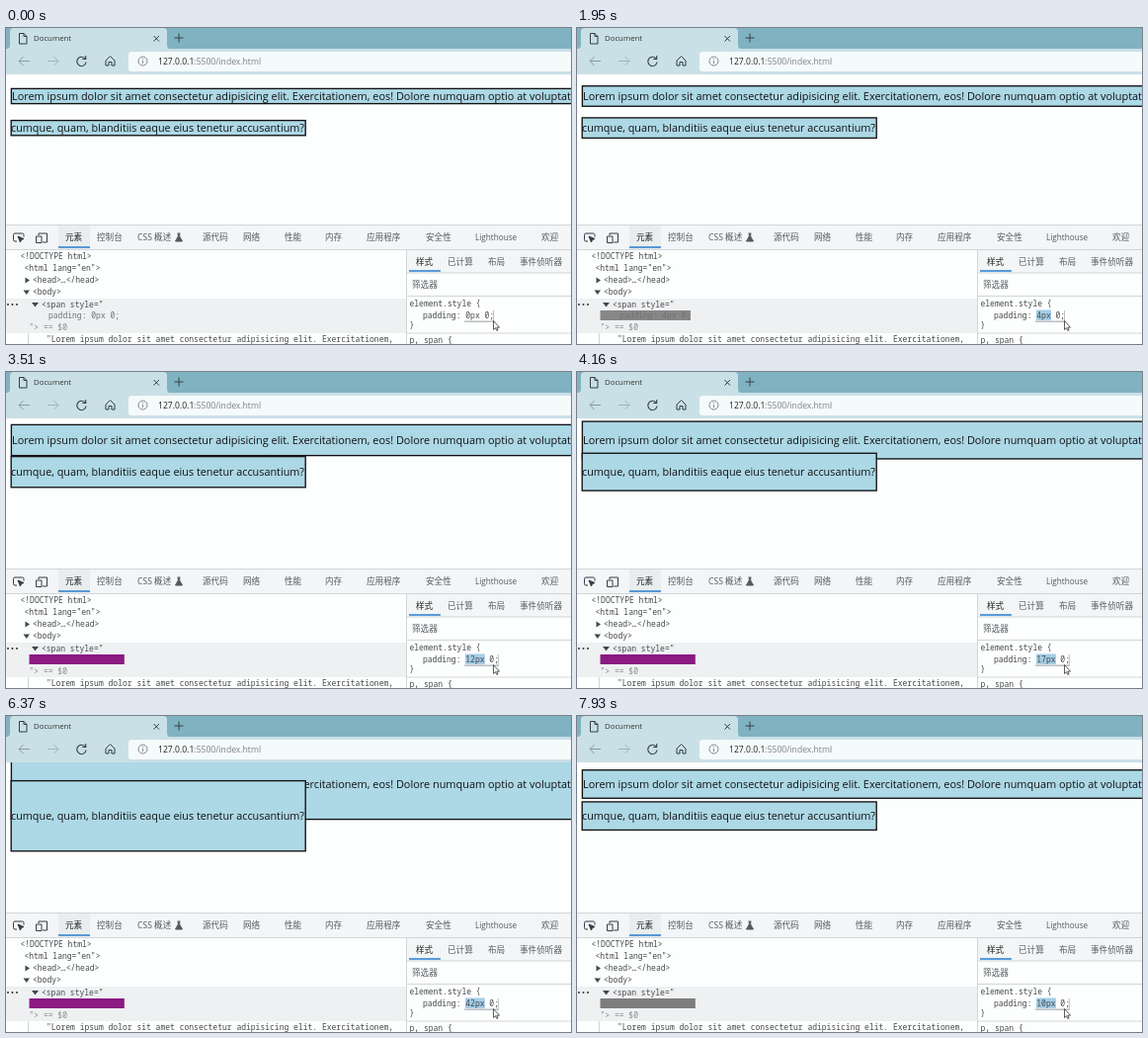
An HTML page for the animation above (8 s loop, 572 px wide and 320 px high).

```html
<!DOCTYPE html>
<html lang="en">
<head>
<meta charset="utf-8">
<style>
  html, body { margin: 0; width: 100%; height: 100%; overflow: hidden; background: #fdfefe; }
  svg { display: block; width: 572px; height: 320px; }
  text { white-space: pre; }
  .page { font-family: "Open Sans", "Noto Sans", sans-serif; fill: #111; }
  .ui { font: 8.6px "Open Sans", "Noto Sans CJK SC", "Noto Sans CJK", sans-serif; fill: #555b60; }
  .code { font: 8.03px "Noto Sans Mono", "DejaVu Sans Mono", monospace; fill: #45484c; }
  .box { fill: #add8e6; stroke: #111; stroke-width: 1.35; }
  .icon { fill: none; stroke: #333e44; stroke-width: 1; }
  .rule { stroke: #d2d5d8; stroke-width: 1; }
</style>
</head>
<body>
<svg viewBox="0 0 572 320">
  <rect width="572" height="320" fill="#fdfefe"/>

  <g class="page">
    <rect id="box1" class="box" x="5.4" width="600"/>
    <text x="6" y="73" font-size="10.92">Lorem ipsum dolor sit amet consectetur adipisicing elit. Exercitationem, eos! Dolore numquam optio at voluptatem</text>
    <rect id="box2" class="box" x="5.2" width="298"/>
    <text x="5" y="105.2" font-size="10.83">cumque, quam, blanditiis eaque eius tenetur accusantium?</text>
  </g>

  <!-- browser frame -->
  <rect width="572" height="22" fill="#80b2c1"/>
  <rect y="21" width="572" height="26" fill="#c9e0e6"/>
  <path d="M1 21Q4 21 4 17V4Q4 0 8 0H159Q163 0 163 4V17Q163 21 166 21Z" fill="#c9e0e6"/>
  <rect x="124" y="24" width="460" height="20" rx="3" fill="#f5fafb"/>
  <g class="icon">
    <path d="M13.5 5.5h4.5l3 3v7.5h-7.5zM18 5.5v3h3"/>
    <path d="M149.5 8l5.5 5.5m0-5.5l-5.5 5.5M170.5 10h9m-4.500-4.500v9"/>
    <path d="M24 33.500H13m4.500-4.500l-4.500 4.500 4.500 4.500" stroke="#8c9ba1"/>
    <path d="M42 33.500H53m-4.500-4.500l4.500 4.500-4.500 4.500" stroke="#a3b5bb"/>
    <path d="M80 31A4.600 4.600 0 1 0 81 34.500M80.700 28v3.500h-3.500" stroke-width="1.100"/>
    <path d="M101 33l4.500-4.500 4.500 4.500v5h-3v-3.500h-3v3.500h-3z"/>
    <g stroke="#7d878b"><circle cx="138.500" cy="33.500" r="4.500"/><path d="M138.500 33v3m0-5.200v1"/></g>
  </g>
  <g class="ui">
    <text x="28" y="13.300" style="font-size:7.8px" fill="#333">Document</text>
    <text x="154" y="36.700" fill="#7a8286"><tspan fill="#222">127.0.0.1</tspan>:5500/index.html</text>
  </g>

  <!-- developer tools -->
  <rect y="199" width="572" height="26" fill="#f3f5f6"/>
  <rect x="53" y="200" width="32" height="24" fill="#e9edf0"/>
  <rect y="225" width="405" height="95" fill="#fdfefe"/>
  <rect x="405" y="225" width="167" height="23" fill="#f3f5f6"/>
  <rect y="274" width="405" height="35" fill="#eff0f2"/>
  <path class="rule" d="M0 199.500H572M0 224.500H572M405.500 225V320M406 248H572M406 271.500H572M406 309H572"/>
  <path d="M53 222H85M408 246H440" stroke="#2a7fd0" stroke-width="1.600"/>
  <g class="icon">
    <path d="M11 216H9q-1.500 0-1.500-1.500v-5q0-1.500 1.500-1.500h7.500q1.500 0 1.500 1.500v2"/>
    <path d="M12 211l6 2.500-2.500 1-1 2.500z" fill="#333e44"/>
    <path d="M33 210v-2h8.500v9H37M30.500 211h5.500v6.500h-5.500z"/>
    <path d="M173.500 208h3m-2.200 0v3l-2.800 5h7l-2.800-5v-3" fill="#555b60" stroke="#555b60"/>
  </g>
  <g id="tabs" class="ui"></g>
  <text class="ui" x="411" y="263" fill="#777">筛选器</text>

  <g class="code">
    <text x="14.500" y="234">&lt;!DOCTYPE html&gt;</text>
    <text x="18.500" y="246">&lt;html lang="en"&gt;</text>
    <text x="27" y="258">&lt;head&gt;…&lt;/head&gt;</text>
    <text x="27" y="270">&lt;body&gt;</text>
    <text x="36" y="282.500">&lt;span style="</text>
    <text id="inline" x="43" y="294"></text>
    <rect id="flash" x="23.500" y="286" height="10"/>
    <text id="flashText" x="43" y="294"></text>
    <text x="23.500" y="306" fill="#8a8d92">"&gt; == $0</text>
    <text x="41" y="318.300">"Lorem ipsum dolor sit amet consectetur adipisicing elit. Exercitationem,</text>
    <path d="M19.500 252.500l4.500 3-4.500 3zM17.500 265.500h6.500l-3.250 4.500zM26 278h7l-3.500 4.500z"/>
    <path d="M22.500 309V320" class="rule"/>
    <path d="M2 280h.01m4.500 0h.01m4.500 0h.01" stroke="#333" stroke-width="2" stroke-linecap="round"/>

    <text x="408.500" y="282">element.style {</text>
    <rect id="editShadow" x="464" y="286" height="12" fill="#b9bdc1"/>
    <rect id="edit" x="463" y="285" height="11.500" fill="#fff"/>
    <rect id="mark" x="465" y="285.500" height="10.500" fill="#a5cde6"/>
    <text id="rule" x="422" y="293.500"></text>
    <text x="408.500" y="304">}</text>
    <text x="408.500" y="319.300">p, span {</text>
  </g>
  <path d="M493.500 296.500v9l2-1.800 1.300 2.800 1.300-.6-1.300-2.700h2.700z" fill="#fff" stroke="#333" stroke-width=".8"/>
</svg>
<script>
const LOOP = 8000, STEP = 130, CHAR = 4.82;
const $ = id => document.getElementById(id);
const set = (id, attrs) => {
  for (const key in attrs) $(id).setAttribute(key, attrs[key]);
};

const tabs = [
  [60, '元素'], [92, '控制台'], [133, 'CSS 概述'], [199, '源代码'], [240, '网络'],
  [282, '性能'], [323, '内存'], [365, '应用程序'], [425, '安全性'],
  [475, 'Lighthouse'], [542, '欢迎'],
  [415, '样式', 239.5], [447, '已计算', 239.5], [488, '布局', 239.5], [520, '事件侦听器', 239.5]
];
for (const [x, label, y = 215.3] of tabs) {
  const el = document.createElementNS('http://www.w3.org/2000/svg', 'text');
  el.textContent = label;
  el.setAttribute('x', x);
  el.setAttribute('y', y);
  if (label === '元素' || label === '样式') el.style.cssText = 'fill:#222;font-weight:500';
  if (label === 'Lighthouse') el.style.fontSize = '8.2px';
  $('tabs').append(el);
}

// [time, padding]: the held arrow key ramps between these points
const keys = [
  [0, 0], [520, 0], [650, 1], [1040, 1], [1820, 4], [2730, 7], [2860, 7],
  [4160, 17], [5200, 26], [5590, 26], [6370, 42], [7930, 10], [8000, 10]
];
function paddingAt(time) {
  const i = Math.max(1, keys.findIndex(([t]) => t >= time));
  const [t0, a] = keys[i - 1], [t1, b] = keys[i];
  return Math.round(a + (b - a) * (time - t0) / (t1 - t0));
}

function setBox(id, center, padding) {
  const half = 7.6 + padding * 2 / 3;
  set(id, { y: center - half, height: half * 2 });
}

function draw(time) {
  const now = Math.floor(time / STEP) * STEP;
  const padding = paddingAt(now);
  const value = padding + 'px';
  const declaration = `padding: ${value} 0;`;
  const active = padding > 0;
  const extra = (value.length - 3) * CHAR;

  let age = 0;
  while (age < now && paddingAt(now - age - STEP) === padding) age += STEP;

  setBox('box1', 69, padding);
  setBox('box2', 101.2, padding);

  const purple = padding > 10;
  set('flash', {
    width: 91.5 + extra,
    fill: purple ? '#8b1a82' : '#7d7d7d',
    opacity: active ? 1 - age / 3000 : 0
  });
  set('flashText', {
    fill: purple ? '#fff' : '#555',
    opacity: active && age > STEP ? .45 : 0
  });
  set('inline', { opacity: active ? 0 : .75 });
  for (const id of ['inline', 'flashText', 'rule']) $(id).textContent = declaration;

  set('mark', { width: 15 + extra, opacity: active ? 1 : 0 });
  set('edit', { width: 30 + extra });
  set('editShadow', { width: 30 + extra });
}

const start = performance.now();
function tick() {
  draw((performance.now() - start) % LOOP);
  requestAnimationFrame(tick);
}
draw(0);
tick();
</script>
</body>
</html>
```
